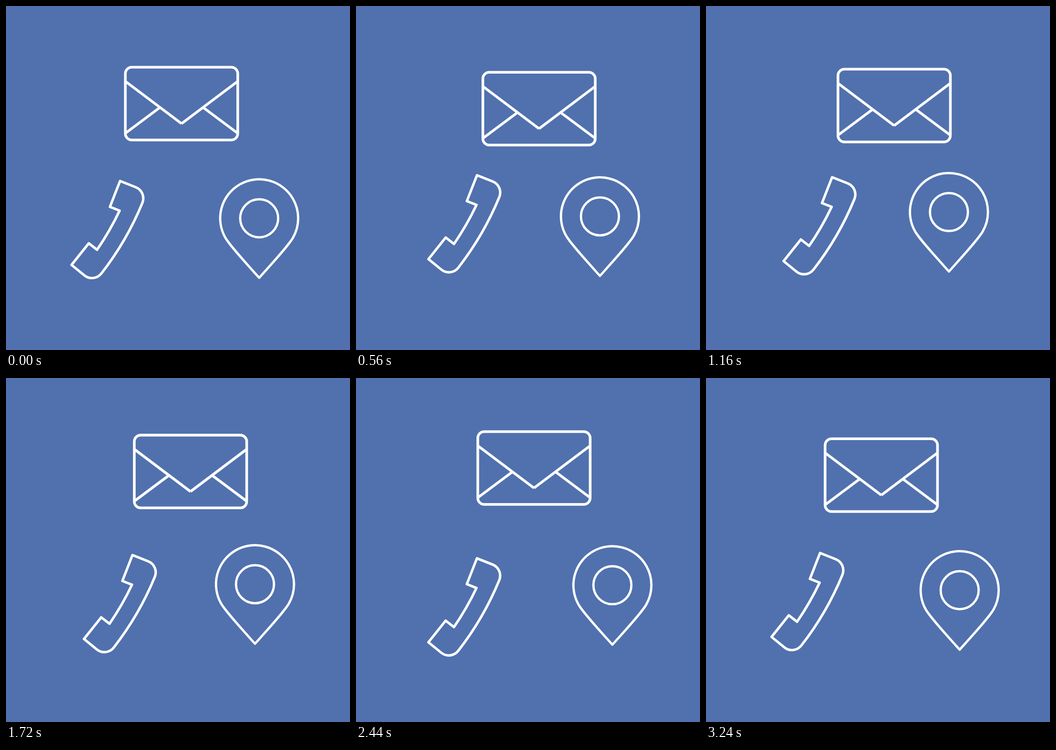
An HTML page with a canvas that plays this animation: 748 px wide and 748 px high, repeating every 3280 ms.

```html
<!DOCTYPE html>
<html lang="en">
<head>
<meta charset="utf-8">
<title>Contact icons</title>
<style>
html, body { margin: 0; width: 100%; height: 100%; overflow: hidden; background: #5071ae; }
canvas { display: block; width: 748px; height: 748px; }
</style>
</head>
<body>
<canvas id="stage" width="748" height="748"></canvas>
<script>
const ctx = document.getElementById('stage').getContext('2d');
const SIZE = 748, LOOP = 3280, STEP = 40;

// Envelope, drawn around its vertical axis
function envelope() {
  const half = 122.2;
  ctx.roundRect(-half, 0, 2 * half, 158.2, 14);
  for (const side of [-half, half]) {
    ctx.moveTo(side, 30.6);
    ctx.lineTo(0, 122.6);
    ctx.moveTo(side, 143.6);
    ctx.lineTo(side * 0.386, 87.6);
  }
}

// Map pin, drawn around the centre of its ring
function pin() {
  const r = 84.8, tip = 129.4, a = Math.PI / 6;
  const x = r * Math.cos(a), y = r * Math.sin(a);
  ctx.moveTo(0, tip);
  ctx.bezierCurveTo(-30.5, 95.4, -63.5, 59.4, -x, y);
  ctx.arc(0, 0, r, Math.PI - a, a);
  ctx.bezierCurveTo(63.5, 59.4, 30.5, 95.4, 0, tip);
  ctx.closePath();
  ctx.moveTo(41.3, 0);
  ctx.arc(0, 0, 41.3, 0, 2 * Math.PI);
}

const handset = new Path2D(
  'M248 380.5 L282 394 A26 26 0 0 1 296.6 427.9 A654 654 0 0 1 207.5 581.4 ' +
  'A26 26 0 0 1 170.3 585.6 L142.5 563 L180 516 L198 530 A610 610 0 0 0 247 445 L226 436.7 Z');

function shape(build) {
  ctx.beginPath();
  build();
  ctx.stroke();
}

// Each icon drifts round a closed curve through evenly timed points
const icons = [
  { x: 381.7, y: 133.1, width: 5.8, period: LOOP, draw: () => shape(envelope),
    path: [[0, 0], [16, 11], [27.4, 5.5], [20.8, -7.3], [10.5, -15.6], [0.5, -14.5]] },
  { x: 0, y: 0, width: 5.4, period: LOOP - STEP, draw: () => ctx.stroke(handset),
    path: [[0, 0], [14.6, -12.4], [25.3, -9.6], [27.8, 2.5], [20, 11.2], [10, 9.8]] },
  { x: 550.5, y: 461.6, width: 5, period: LOOP, draw: () => shape(pin),
    path: [[0, 0], [-19.8, -4], [-23, -13.2], [-11, -13.2], [2.2, -12.6], [9.6, -8.3]] }
];

function catmullRom(a, b, c, d, u) {
  return b + u / 2 * (c - a + u * (2 * a - 5 * b + 4 * c - d + u * (3 * (b - c) + d - a)));
}

function drift({ path, period }, time) {
  const n = path.length, s = time / period * n, i = Math.floor(s);
  const [a, b, c, d] = [-1, 0, 1, 2].map(k => path[(i + k + n) % n]);
  return [0, 1].map(axis => catmullRom(a[axis], b[axis], c[axis], d[axis], s - i));
}

function draw(time) {
  ctx.fillStyle = '#5071ae';
  ctx.fillRect(0, 0, SIZE, SIZE);
  ctx.strokeStyle = '#fff';
  ctx.lineJoin = 'round';
  for (const icon of icons) {
    const [dx, dy] = drift(icon, time);
    ctx.save();
    ctx.translate(icon.x + dx, icon.y + dy);
    ctx.lineWidth = icon.width;
    icon.draw();
    ctx.restore();
  }
}

function tick() {
  draw(Math.floor((performance.now() % LOOP) / STEP) * STEP);
  requestAnimationFrame(tick);
}
tick();
</script>
</body>
</html>
```
